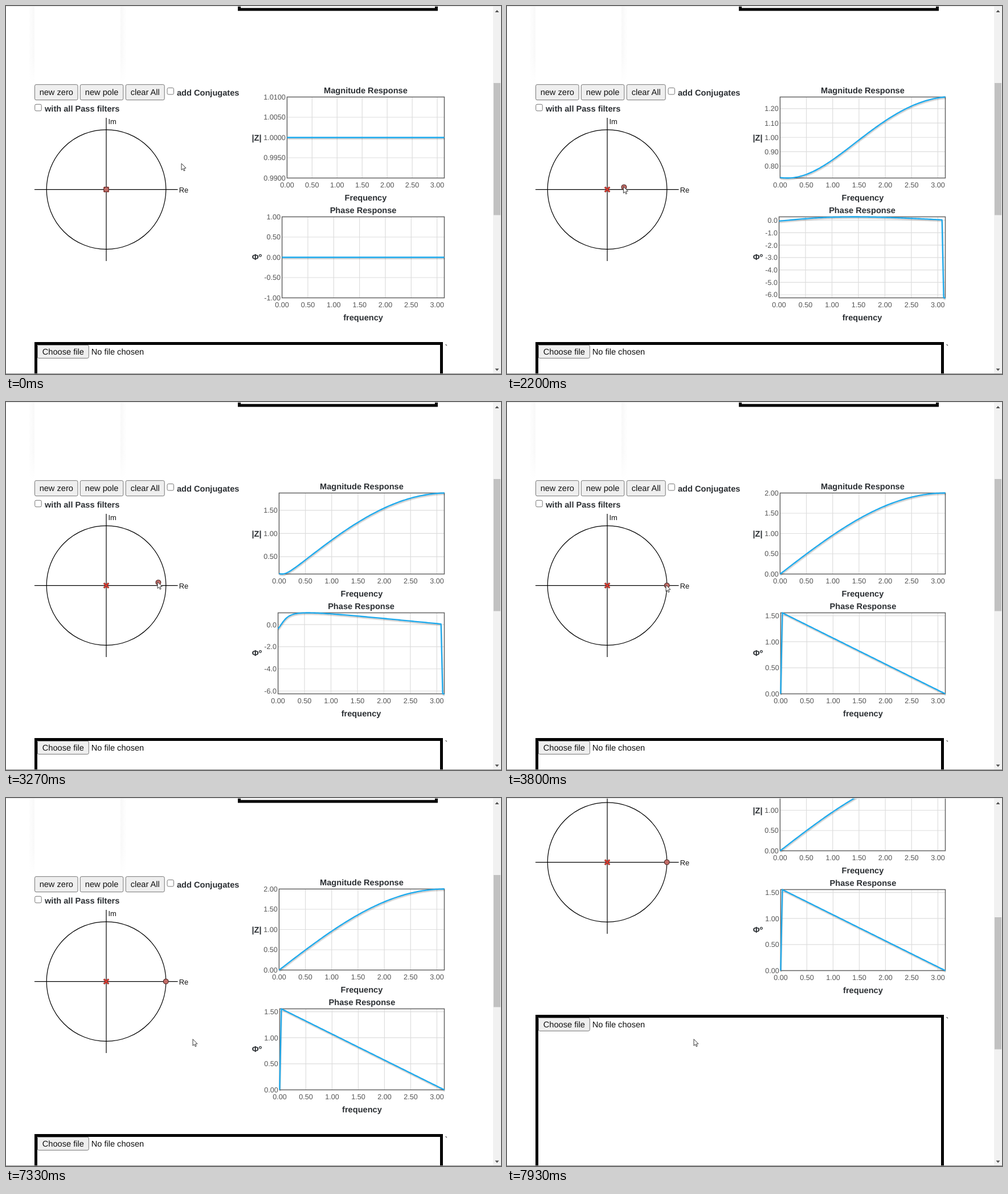
Write an HTML page that moves like this. It is 869x645 px and loops after 8000 ms.

```html
<!DOCTYPE html>
<html lang="en">
<head>
<meta charset="utf-8">
<title>Pole-zero editor</title>
<style>
  html, body { margin: 0; width: 100%; height: 100%; overflow: hidden; background: #fff; }
  svg { display: block; width: 869px; height: 645px; }
  text { font: 14.6px "Liberation Sans", Arial, sans-serif; fill: #111; text-rendering: geometricPrecision; }
  .bold { font-weight: bold; fill: #2b2f33; }
  .tick { font-size: 12.6px; fill: #545454; }
  .axis { font-size: 12.9px; }
  .mid { text-anchor: middle; }
  .end { text-anchor: end; }
  .btn { fill: #efefef; stroke: #767676; }
  .check { fill: #fff; stroke: #767676; }
  .grid { stroke: #ddd; stroke-width: 1.2; }
  .thin { fill: none; stroke: #000; stroke-width: 1.2; }
  .thick { fill: none; stroke: #000; stroke-width: 5; }
  .curve { fill: none; stroke-linejoin: round; }
</style>
</head>
<body>
<svg viewBox="0 0 869 645">
  <defs>
    <linearGradient id="fadeL"><stop offset="0" stop-color="#fff"/><stop offset="1" stop-color="#f8f8f8"/></linearGradient>
    <linearGradient id="fadeR"><stop offset="0" stop-color="#f8f8f8"/><stop offset="1" stop-color="#fff"/></linearGradient>
    <linearGradient id="fadeDown" x2="0" y2="1"><stop offset="0" stop-color="#fff" stop-opacity="0"/><stop offset="1" stop-color="#fff"/></linearGradient>
  </defs>
  <rect width="869" height="645" fill="#fff"/>

  <g id="page">
    <rect x="39" y="-20" width="11" height="156" fill="url(#fadeL)"/>
    <rect x="201" y="-20" width="11" height="156" fill="url(#fadeR)"/>
    <rect x="36" y="86" width="180" height="50" fill="url(#fadeDown)"/>
    <path class="thick" d="M409.5 -20V6H755.5V-20"/>

    <g id="buttons"></g>
    <rect class="check" x="283" y="143.5" width="11.5" height="11.5" rx="2.3"/>
    <text class="bold" x="300" y="156.5">add Conjugates</text>
    <rect class="check" x="50.7" y="172.3" width="11.5" height="11.5" rx="2.3"/>
    <text class="bold" x="68" y="185.3">with all Pass filters</text>

    <circle class="thin" cx="176" cy="321.6" r="104.8"/>
    <path class="thin" d="M50 321.6H301.5M176 196V447"/>
    <text class="axis" x="179.5" y="207">Im</text>
    <text class="axis" x="303.7" y="327">Re</text>
    <g transform="translate(176 321.6)" fill="none">
      <path d="M-4.2-4.2L4.2 4.2M4.2-4.2L-4.2 4.2" stroke="#8e2a24" stroke-width="3.2"/>
      <path d="M-3.8-3.8L3.8 3.8M3.8-3.8L-3.8 3.8" stroke="#da3b30" stroke-width="2"/>
    </g>
    <circle id="zero" r="4.4" fill="#c26c67" stroke="#46211f" stroke-width="1.1"/>

    <text class="bold mid" x="440" y="235.5">|Z|</text>
    <text class="bold mid" x="440.5" y="445">Φº</text>
    <g id="mag"></g>
    <g id="phase"></g>

    <path class="thick" d="M52.5 1000V591.5H764.5V1000"/>
    <text x="149.7" y="611">No file chosen</text>
    <text x="770.5" y="604">`</text>
  </g>

  <rect width="869" height="1" fill="#e3e3e3"/>
  <rect x="855" y="1" width="14" height="643" fill="#f1f1f1"/>
  <rect id="thumb" x="856" y="135" width="12" height="231.5" fill="#c1c1c1"/>
  <path d="M858.5 11L862 7L865.5 11ZM858.5 635.5L862 639.5L865.5 635.5Z" fill="#505050"/>
  <rect y="644" width="869" height="1" fill="#8c8c8c"/>
  <path id="cursor" d="M0 0V11.4L2.6 9.1L4.3 13L6.1 12.2L4.4 8.4L8 8.1Z" fill="#fff" stroke="#222" stroke-width=".9"/>
</svg>

<script>
const $ = id => document.getElementById(id);
const LOOP = 8000, STEP = 200 / 3, SAMPLES = 100;
const CENTER = { x: 176, y: 321.6 }, RADIUS = 104.7;
const RIGHT = 769.5, HEIGHT = 142, TICK_FONT = 12.6;

// Keys are [time, x, y]
const ZERO_KEYS = [
  [1800, 0, 0], [2270, .33, .045], [2667, .595, .064], [2800, .67, .062],
  [3200, .85, .055], [3533, .965, .03], [3800, 1, 0]
];
const CURSOR_KEYS = [
  [0, 308, 276], [867, 175, 318], [1200, 173.5, 321], [1800, 173.5, 321]
];
const ROAM_KEYS = [
  [5000, 278, 320.3], [5670, 758, 156], [5867, 716, 168],
  [6733, 489, 298], [7333, 328, 422.7]
];

const linear = u => u;
const smooth = u => u * u * (3 - 2 * u);

function follow(keys, t, ease) {
  if (t <= keys[0][0]) return keys[0].slice(1);
  for (let i = 1; i < keys.length; i++) {
    const [t0, ...a] = keys[i - 1], [t1, ...b] = keys[i];
    if (t < t1) {
      const u = ease((t - t0) / (t1 - t0));
      return a.map((v, k) => v * (1 - u) + b[k] * u);
    }
  }
  return keys[keys.length - 1].slice(1);
}

const label = (x, y, text, cls) => `<text class="${cls}" x="${x}" y="${y}">${text}</text>`;

function textWidth(s) {
  const em = { ".": .278, "-": .333 };
  return TICK_FONT * [...s].reduce((sum, c) => sum + (em[c] || .556), 0);
}

function makeTicks(min, max, count) {
  const delta = (max - min) / count;
  const exp = Math.floor(Math.log10(delta)), unit = 10 ** exp, norm = delta / unit;
  const size = unit * (norm < 1.5 ? 1 : norm < 2.25 ? 2 : norm < 3 ? 2.5 : norm < 7.5 ? 5 : 10);
  const ticks = [];
  for (let k = Math.ceil(min / size - 1e-6); k * size <= max + size * 1e-6; k++) {
    ticks.push({ v: k * size, text: (k * size).toFixed(Math.max(0, 1 - exp)) });
  }
  return ticks;
}

function drawPlot(group, values, top, base, title, caption) {
  let min = Math.min(...values), max = Math.max(...values);
  if (max - min < 1e-6) {
    const mean = Math.round(max), pad = mean ? .01 : 1;
    values = values.map(() => mean);
    min = mean - pad;
    max = mean + pad;
  }
  const bottom = top + HEIGHT;
  const yTicks = makeTicks(min, max, 4.75), xTicks = makeTicks(0, Math.PI, 5.5);
  const left = base + Math.max(...yTicks.map(k => textWidth(k.text)));
  const px = w => left + (RIGHT - left) * w / Math.PI;
  const py = v => bottom - HEIGHT * (v - min) / (max - min);
  const mid = (left + RIGHT) / 2;

  let out = label(mid, top - 6.3, title, "bold mid") + label(mid, bottom + 39.4, caption, "bold mid");
  for (const { v, text } of xTicks) {
    const x = px(v);
    if (v > 0) out += `<path class="grid" d="M${x} ${top}V${bottom}"/>`;
    out += label(x, bottom + 16.3, text, "tick mid");
  }
  for (const { v, text } of yTicks) {
    const y = py(v);
    out += `<path class="grid" d="M${left} ${y}H${RIGHT}"/>` + label(left - 2.6, y + 4.4, text, "tick end");
  }
  out += `<rect x="${left}" y="${top}" width="${RIGHT - left}" height="${HEIGHT}" fill="none" stroke="#646464" stroke-width="1.5"/>`;

  const d = "M" + values.map((v, i) =>
    `${px(i * Math.PI / SAMPLES).toFixed(2)} ${py(v).toFixed(2)}`).join("L");
  const stroke = (dx, dy, width, color) =>
    `<path class="curve" transform="translate(${dx} ${dy})" d="${d}" stroke="${color}" stroke-width="${width}"/>`;
  out += stroke(.8, 2.5, 2.8, "rgba(0,0,0,.11)") + stroke(.6, 1.8, 1.5, "rgba(0,0,0,.11)") + stroke(0, 0, 2.3, "#1caaee");
  group.innerHTML = out;
}

function drawResponse(re, im) {
  const mag = [], phase = [];
  for (let i = 0; i <= SAMPLES; i++) {
    const w = i * Math.PI / SAMPLES;
    const dx = Math.cos(w) - re, dy = Math.sin(w) - im;
    mag.push(Math.hypot(dx, dy));
    phase.push(Math.atan2(dy, dx) - w);
  }
  drawPlot($("mag"), mag, 159.5, 454.9, "Magnitude Response", "Frequency");
  drawPlot($("phase"), phase, 369.5, 455.9, "Phase Response", "frequency");
}

const place = (el, x, y) => el.setAttribute("transform", `translate(${x} ${y})`);

let shown = "";
function render(t) {
  const [re, im] = follow(ZERO_KEYS, t, linear);
  const zx = CENTER.x + RADIUS * re, zy = CENTER.y - RADIUS * im;
  place($("zero"), zx, zy);
  if (shown !== re + "," + im) {
    shown = re + "," + im;
    drawResponse(re, im);
  }

  let tip;
  if (t <= 1800) tip = follow(CURSOR_KEYS, t, smooth);
  else if (t < 5000) tip = [zx - 1.7 + .9 * Math.sin(Math.PI * re), zy - 1];
  else tip = follow(ROAM_KEYS, t, smooth);
  place($("cursor"), ...tip);

  const u = smooth(Math.min(1, Math.max(0, (t - 7533.3) / 400)));
  place($("page"), 0, -209 * u);
  $("thumb").setAttribute("y", 135 + 74 * u);
}

const button = (x, y, w, h, text) =>
  `<rect class="btn" x="${x}" y="${y}" width="${w}" height="${h}" rx="2.5"/>` +
  label(x + w / 2, y + h / 2 + 5.2, text, "mid");
$("buttons").innerHTML =
  button(50.5, 137.7, 75.5, 27, "new zero") + button(130.3, 137.7, 75.5, 27, "new pole") +
  button(210.2, 137.7, 68, 27, "clear All") + button(55.3, 594.3, 90, 23, "Choose file");

const start = performance.now();
function tick() {
  const t = Math.max(0, performance.now() - start) % LOOP;
  render(Math.floor((t + 4) / STEP) * STEP);
  requestAnimationFrame(tick);
}
tick();
</script>
</body>
</html>
```
